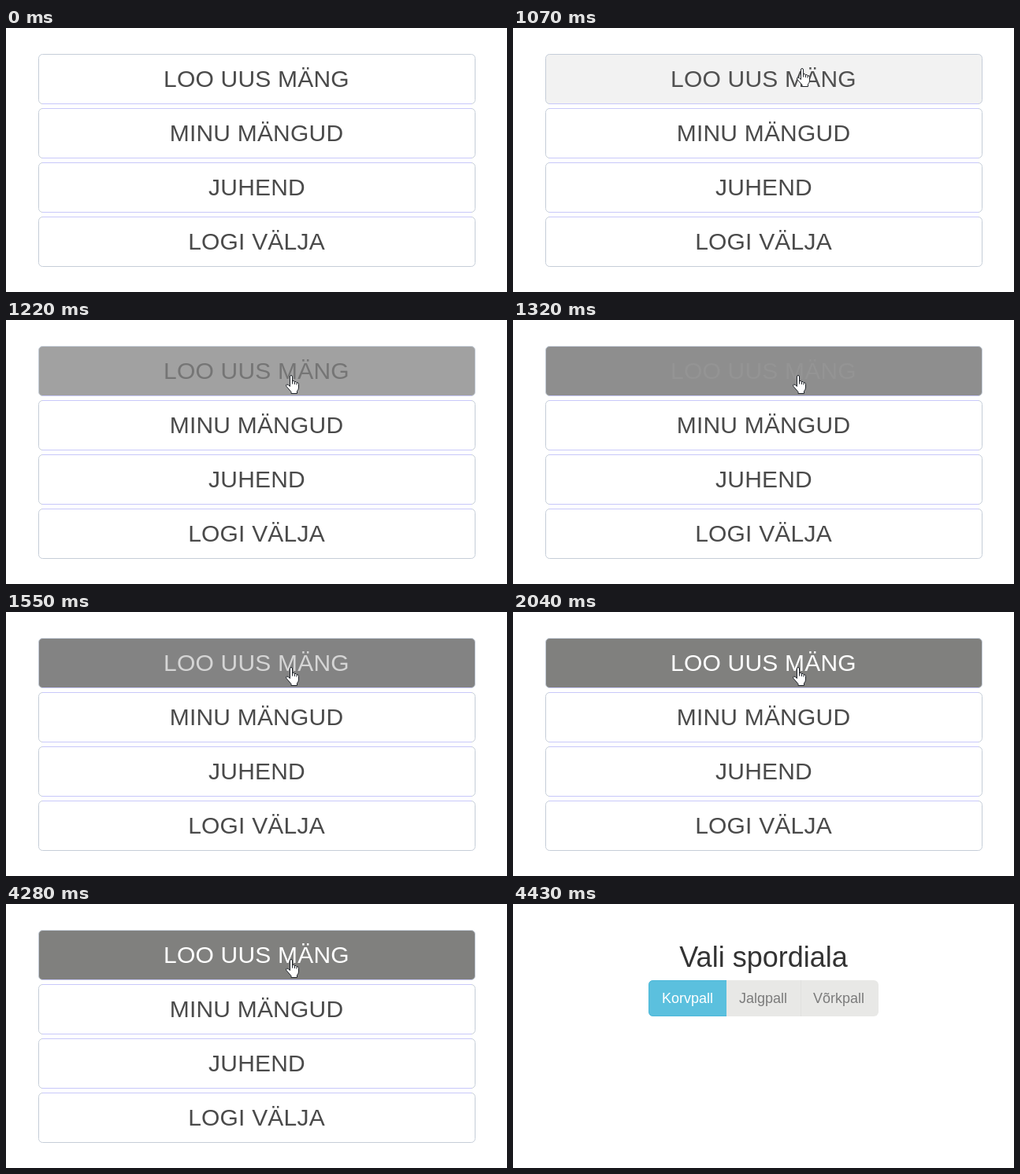
Write an HTML page that moves like this. It is 636 by 336 pixels and loops after 4.59 s.

```html
<!DOCTYPE html>
<html lang="et">
<head>
<meta charset="utf-8">
<title>Mängu menüü</title>
<style>
  html, body { margin: 0; width: 100%; height: 100%; overflow: hidden; background: #fff; }
  svg { display: block; width: 636px; height: 336px; font-family: Arial, "Liberation Sans", sans-serif; }

  .menu text { font-size: 30px; letter-spacing: .2px; font-kerning: none; text-anchor: middle; fill: #4a4a4a; }
  .box { fill: #fff; stroke: #c5cdd8; }
  .rule { stroke: #c8c8fa; }
  .title { font-size: 36px; text-anchor: middle; fill: #333; }
  .tabs text { font-size: 18px; font-kerning: none; fill: #7b7b7b; }
  .cursor path { fill: #fff; stroke: #20242a; stroke-linejoin: round; }

  .menu, .sport, .menu .label, .fill, .cursor, .hand, .arrow, .ring {
    animation: 4590ms step-end infinite;
  }
  .menu { animation-name: menu; }
  .sport { animation-name: sport; }
  .fill { animation-name: fill; }
  .menu .label { animation-name: label; }
  .cursor { animation-name: move; }
  .hand { animation-name: hand; }
  .arrow { animation-name: arrow; }
  .ring { animation-name: ring; }

  @keyframes menu { 0% { opacity: 1 } 96.514%, 100% { opacity: 0 } }
  @keyframes sport { 0% { opacity: 0 } 96.514%, 100% { opacity: 1 } }

  @keyframes fill {
    0% { fill: #fff }
    21.35% { fill: rgb(253, 253, 253) }
    23.311% { fill: rgb(242, 242, 242) }
    25.054% { fill: rgb(203, 203, 203) }
    26.579% { fill: rgb(161, 161, 161) }
    28.758% { fill: rgb(142, 142, 142) }
    30.501% { fill: rgb(136, 136, 136) }
    32.243% { fill: rgb(133, 133, 133) }
    33.769% { fill: rgb(131, 131, 131) }
    35.729% { fill: rgb(130, 130, 129) }
    37.472% { fill: rgb(129, 129, 128) }
    38.997%, 100% { fill: rgb(128, 128, 126) }
  }

  @keyframes label {
    0% { fill: #4a4a4a }
    23.311% { fill: rgb(80, 80, 80) }
    25.054% { fill: rgb(97, 97, 97) }
    26.579% { fill: rgb(117, 117, 117) }
    28.758% { fill: rgb(148, 148, 148) }
    30.501% { fill: rgb(175, 175, 175) }
    32.243% { fill: rgb(197, 197, 197) }
    33.769% { fill: rgb(213, 213, 213) }
    35.729% { fill: rgb(227, 227, 227) }
    37.472% { fill: rgb(237, 237, 237) }
    38.997% { fill: rgb(244, 244, 244) }
    40.74% { fill: rgb(249, 249, 249) }
    42.483% { fill: rgb(253, 253, 253) }
    44.444%, 100% { fill: #fff }
  }

  @keyframes move {
    0% { transform: translate(374px, -30px) }
    15.904% { transform: translate(374px, 0) }
    17.647% { transform: translate(373px, 8px) }
    19.389% { transform: translate(371px, 21px) }
    21.35% { transform: translate(369px, 38px) }
    23.311% { transform: translate(366px, 51px) }
    25.054% { transform: translate(363px, 63px) }
    26.579%, 100% { transform: translate(361px, 70px) }
  }
  @keyframes hand {
    0% { opacity: 0 }
    21.35% { opacity: 1 }
    78.867% { opacity: 0 }
    93.246%, 100% { opacity: 1 }
  }
  @keyframes arrow {
    0% { opacity: 1 }
    21.35% { opacity: 0 }
    78.867% { opacity: 1 }
    93.246%, 100% { opacity: 0 }
  }
  @keyframes ring {
    0% { opacity: 0 }
    78.867% { opacity: 1 }
    93.246%, 100% { opacity: 0 }
  }
</style>
</head>
<body>
<svg viewBox="0 0 636 336">
  <g class="menu">
    <rect class="box fill" x="41.5" y="33.5" width="554" height="63" rx="5"/>
    <rect class="box" x="41.5" y="102.5" width="554" height="63" rx="5"/>
    <rect class="box" x="41.5" y="171.5" width="554" height="63" rx="5"/>
    <rect class="box" x="41.5" y="240.5" width="554" height="63" rx="5"/>
    <path class="rule" d="M46 96.5H591M46 102.5H591M46 165.5H591M46 171.5H591M46 234.5H591M46 240.5H591"/>
    <text class="label" x="318" y="75">LOO UUS MÄNG</text>
    <text x="318" y="144">MINU MÄNGUD</text>
    <text x="318.5" y="213">JUHEND</text>
    <text x="318" y="282">LOGI VÄLJA</text>

    <g class="cursor">
      <g class="hand">
        <path d="M-.5 2Q-.5 .5 1 .5T2.5 2V7.5Q5 6.8 5.3 8.5Q7.6 7.9 8 9.6Q10.5 9.3 10.5 11.5V16Q10.5 18.5 8.5 20.5V23.5H1V21.5L-5 14.5Q-6 12.5-4.5 12Q-3 11.8-.5 14.5Z"/>
        <path d="M2.5 7V11.5M5.4 8.3V12M8 9.5V12.5"/>
      </g>
      <path class="arrow" d="M.5 .8V16L4 12.8L6.4 18.5L8.8 17.5L6.5 12H10.8Z"/>
      <g class="ring">
        <circle cx="13" cy="1" r="5.6" fill="#1583dc" stroke="#2b9bef" stroke-width="4"/>
        <path d="M10.5 4L15.5-1.5" style="fill:none;stroke:#62c0fa;stroke-width:2"/>
      </g>
    </g>
  </g>

  <g class="sport">
    <text class="title" x="318" y="80">Vali spordiala</text>
    <g class="tabs">
      <rect x="172" y="97" width="292" height="46" rx="6" fill="#e8e8e6"/>
      <path d="M365.5 97V143" stroke="#e1e1df"/>
      <path d="M271 97.5H178Q172.5 97.5 172.5 103V137Q172.5 142.5 178 142.5H271" fill="#5bc0de" stroke="#4cb9da"/>
      <text x="189" y="126" style="fill:#fff">Korvpall</text>
      <text x="287" y="126">Jalgpall</text>
      <text x="381" y="126">Võrkpall</text>
    </g>
  </g>
</svg>
</body>
</html>
```
